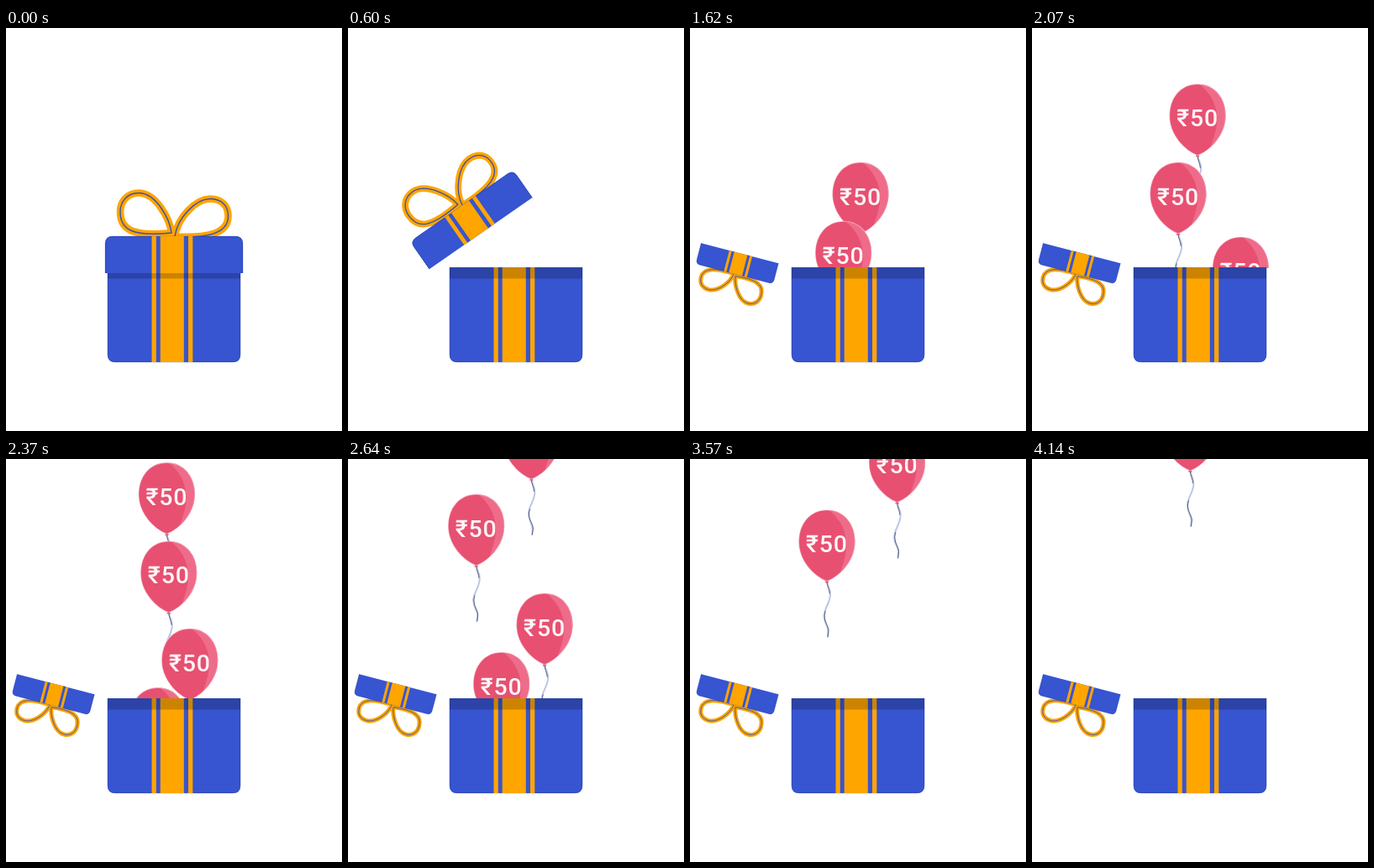
Animation of 400x480 px, one loop 4170 ms. Source, as an HTML page:

```html
<!DOCTYPE html>
<html lang="en">
<head>
<meta charset="utf-8">
<title>Gift box</title>
<style>
  html, body { margin: 0; width: 100%; height: 100%; overflow: hidden; background: #fff; }
  svg { display: block; width: 400px; height: 480px; }
  text { font: 500 28.5px Roboto, sans-serif; letter-spacing: .8px; fill: #fff5f7; text-anchor: middle; }
</style>
</head>
<body>
<svg viewBox="0 0 400 480">
  <defs>
    <clipPath id="above"><rect width="400" height="285.5"/></clipPath>
    <path id="skin" d="M0 0C20 0 33.5 16 33.5 38C33.5 60 16 79 0 85C-16 79 -33.5 60 -33.5 38C-33.5 16 -20 0 0 0Z"/>
    <clipPath id="inside"><use href="#skin"/></clipPath>
    <g id="balloon">
      <g fill="none" stroke-linecap="round">
        <path d="M0 85C1 92 5 94 4 102C3 112 -3 117 -3.5 126C-3.5 134 1 138 1.5 144L1 151" stroke="#bcc6e4" stroke-width="2"/>
        <path d="M0 85C0 92 4 95 3.2 102C3 112 -2 117 -2.8 126C-3 134 2 138 2 144L1 151" stroke="#4a5278" stroke-width=".9" stroke-dasharray="15 22 40"/>
      </g>
      <path d="M0 82L-2.5 86.5H2.5Z" fill="#e4506f"/>
      <use href="#skin" fill="#e75071"/>
      <path d="M1 -1C14 9 22 22 23 38C24 50 21 59 16 74L40 60V-1Z" fill="#ee6c89" clip-path="url(#inside)"/>
      <use href="#skin" fill="none" stroke="#fff" stroke-width="1.3" opacity=".35"/>
      <text x="0" y="50.6">₹50</text>
    </g>
    <g id="ribbon">
      <path d="M173.5 0H222.3V1H173.5Z" fill="#ffa500"/>
      <path d="M178.8 0H183.7V1H178.8ZM211.8 0H217V1H211.8Z" fill="#3754d1"/>
    </g>
    <path id="bow" d="M197 244C195 228 179 196.5 158 196.5C143 196.5 136 208 136 219C136 240 150 249 197 244ZM201 248.5C204 226 226 203.5 243 203.5C257 203.5 264.5 212 264.5 224C264.5 246 238 250 201 248.5Z"/>
  </defs>
  <g id="balloons" clip-path="url(#above)"></g>
  <g id="box">
    <path d="M121 285H279V389Q279 398 270 398H130Q121 398 121 389Z" fill="#3754d1"/>
    <path d="M121.2 285V389Q121.2 397.7 130 397.7H270Q278.8 397.7 278.8 389V285" fill="none" stroke="#2743ac" stroke-width=".7"/>
    <use href="#ribbon" transform="translate(0 285) scale(1 113)"/>
    <path d="M121 285H279V298.5H121Z" fill="#000" opacity=".2"/>
  </g>
  <g id="lid">
    <g fill="none" stroke-linejoin="round">
      <use href="#bow" stroke="#ffa500" stroke-width="8.6"/>
      <use href="#bow" stroke="#3a4fae" stroke-width="1.4"/>
    </g>
    <path d="M118 292V257Q118 248 127 248H273Q282 248 282 257V292Z" fill="#3754d1"/>
    <path d="M118.3 292V257Q118.3 248.3 127 248.3H273Q281.7 248.3 281.7 257V292" fill="none" stroke="#2743ac" stroke-width=".7"/>
    <use href="#ribbon" transform="translate(0 248) scale(1 44)"/>
  </g>
</svg>
<script>
const LOOP = 4170, STEP = 30;
const LID_START = 525, LID_TIME = 555;

// [time, value] along the shared balloon path
const RISE = [[870, 277], [1620, 160], [2190, 42], [2570, -37.5], [2670, -71]];
const SWAY = [[640, 195], [1070, 217.5], [1440, 183], [1830, 228.5], [2230, 180.5], [2620, 218.5], [3000, 190]];

// launch delay and sideways offset of each balloon
const BALLOONS = [[0, 0], [450, -29], [1020, 31], [1470, -29]];

const clamp = v => Math.min(1, Math.max(0, v));
const linear = u => u;
const swing = u => (1 - Math.cos(Math.PI * clamp(u))) / 2;

function along(keys, t, ease) {
  let i = 0;
  while (i < keys.length - 2 && t > keys[i + 1][0]) i++;
  const [t0, a] = keys[i], [t1, b] = keys[i + 1];
  return a + (b - a) * ease((t - t0) / (t1 - t0));
}

const layer = document.getElementById('balloons');
const lid = document.getElementById('lid');

const nodes = BALLOONS.map(() => {
  const use = document.createElementNS('http://www.w3.org/2000/svg', 'use');
  use.setAttribute('href', '#balloon');
  return layer.appendChild(use);
});

function drawLid(t) {
  const p = Math.sin(clamp((t - LID_START) / LID_TIME) * Math.PI / 2);
  const x = 200 + p * (-369 + 221 * p);
  const y = 242 + p * (-276.5 + p * (580.8 - 250 * p));
  lid.setAttribute('transform',
    `translate(${x} ${y}) rotate(${-165.4 * p}) scale(${1 - 0.42 * p}) translate(-200 -242)`);
}

function draw(t) {
  drawLid(t);
  BALLOONS.forEach(([delay, dx], i) => {
    const age = t - delay;
    const x = along(SWAY, age, swing) + dx;
    const y = along(RISE, age, linear);
    nodes[i].setAttribute('transform', `translate(${x} ${y})`);
  });
}

const start = performance.now();
function tick() {
  const t = (performance.now() - start) % LOOP;
  draw(Math.floor(t / STEP) * STEP);
  requestAnimationFrame(tick);
}
draw(0);
requestAnimationFrame(tick);
</script>
</body>
</html>
```
